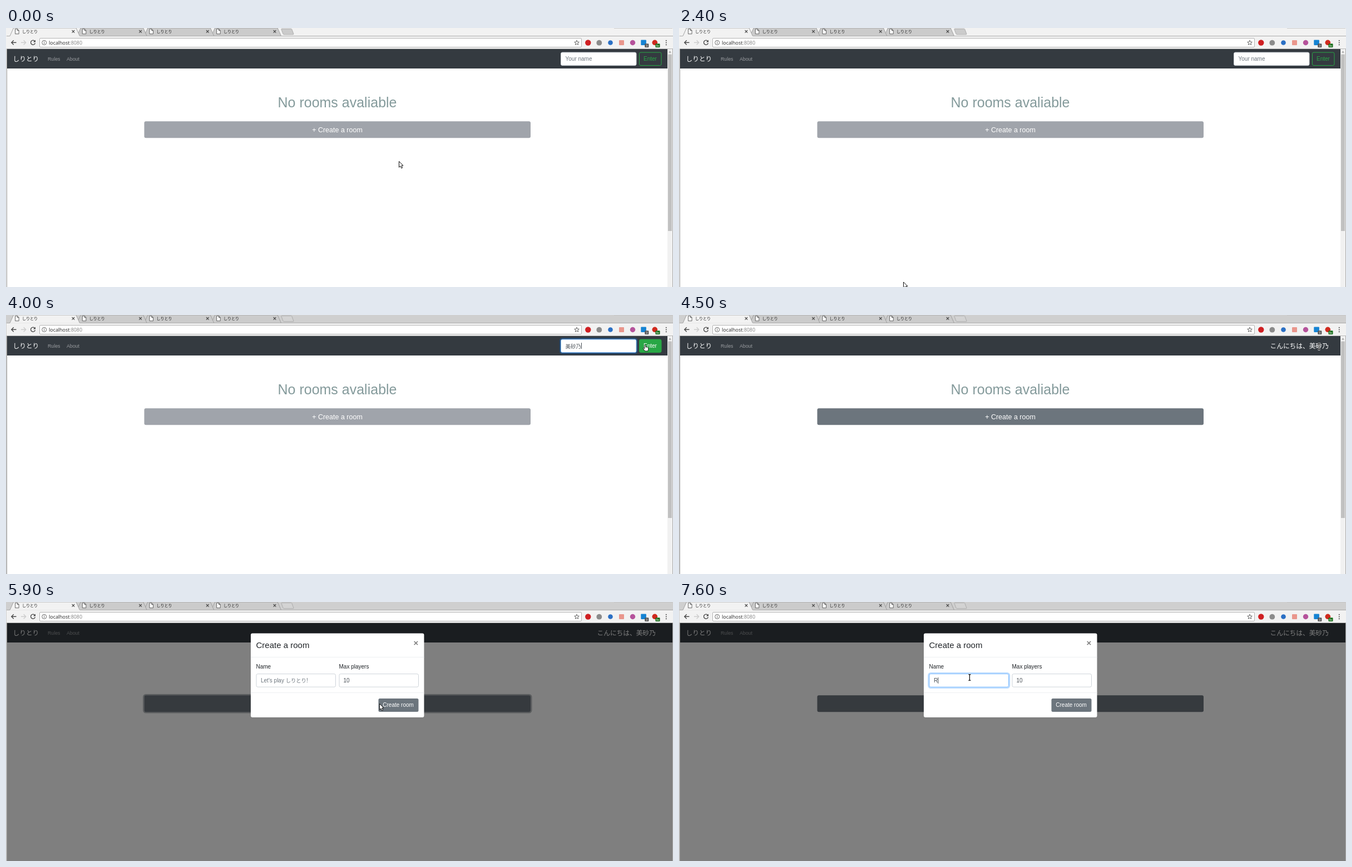
These frames come from a looping animation (1199 px wide and 467 px high, 8 s). An HTML page:

```html
<!DOCTYPE html>
<html lang="ja">
<head>
<meta charset="utf-8">
<title>しりとり</title>
<style>
html, body { margin: 0; width: 100%; height: 100%; overflow: hidden; background: #fff; }
svg { display: block; width: 1199px; height: 467px; }
text { font-family: "Liberation Sans", "Noto Sans CJK JP", "Noto Sans CJK", sans-serif; white-space: pre; }
.jp { font-family: "Noto Sans CJK JP", "Noto Sans CJK", sans-serif; }
.url { font-family: "Noto Sans", sans-serif; }
</style>
</head>
<body>
<svg id="stage" viewBox="0 0 1199 467"></svg>
<script>
const LOOP = 8000;
const USER = "美砂乃";
const stage = document.getElementById("stage");

const rect = (x, y, w, h, fill, more = "") =>
  `<rect x="${x}" y="${y}" width="${w}" height="${h}" fill="${fill}" ${more}/>`;
const text = (x, y, size, fill, str, more = "") =>
  `<text x="${x}" y="${y}" font-size="${size}" fill="${fill}" ${more}>${str}</text>`;
const path = (d, stroke, width = 1, fill = "none", more = "") =>
  `<path d="${d}" stroke="${stroke}" stroke-width="${width}" fill="${fill}" ${more}/>`;
const circle = (x, y, r, fill, more = "") =>
  `<circle cx="${x}" cy="${y}" r="${r}" fill="${fill}" ${more}/>`;
const group = (id, body, more = "") => `<g id="${id}" ${more}>${body}</g>`;
const field = (x, y, w, h) => rect(x, y, w, h, "#fff", 'rx="2.5" stroke="#ced4da"');
const focusField = (x, y, w, h) =>
  rect(x - 1.5, y - 1.5, w + 3, h + 3, "none", 'rx="4" stroke="#007bff" stroke-opacity=".28" stroke-width="2.4"') +
  rect(x, y, w, h, "#fff", 'rx="2.5" stroke="#80bdff"');
const caret = (id, x, y) => rect(x, y, 1, 11, "#495057", `id="${id}"`);
const JP = 'class="jp"';

function tab(i) {
  const x = i * 120.7;
  const shape = `M${7 + x} 14.5L${13.5 + x} 0H${126 + x}L${132.5 + x} 14.5`;
  return path(shape, "#9a9a9a", 0.9, i ? "#cbcbcb" : "#f2f2f2", i ? 'class="tab"' : "") +
    path(`M${16.6 + x} 1.8h4l2.5 2.5v6.4h-6.5zM${20.4 + x} 1.8v2.7h2.7`, "#555", 0.9, "#fff") +
    text(29 + x, 8.8, 7, "#222", "しりとり", JP) +
    path(`M${118.6 + x} 4l4.6 4.6m0-4.6l-4.6 4.6`, "#444", 1.1);
}

function browser() {
  const tabs = [3, 2, 1, 0].map(tab).join("");
  const icons =
    path("M18.5 26.3H10m3.8-4l-4 4 4 4", "#4a4a4a", 1.4) +
    path("M27 26.3h8.5m-3.8-4l4 4-4 4", "#cdcdcd", 1.4) +
    path("M51.8 23.8a4 4 0 1 0 .6 3.4", "#4a4a4a", 1.4) +
    path("M53 21.6v4h-4z", "none", 0, "#4a4a4a") +
    circle(68.7, 26.4, 4, "none", 'stroke="#555" stroke-width=".9"') +
    path("M68.7 25.7v2.8m0-4.8v1.1", "#555", 1) +
    path("M1026 22.2l1.2 2.9 3.1.2-2.4 2 .8 3-2.7-1.7-2.7 1.7.8-3-2.4-2 3.1-.2z", "#555", 0.9) +
    circle(1046.3, 26.5, 5.2, "#cf1f22") +
    circle(1066.3, 26.7, 4.9, "#8b8b8b") +
    circle(1086.5, 26.5, 4.3, "#2a6fc4") +
    rect(1102, 22, 9, 9, "#e9968c", 'rx="1"') +
    circle(1126.5, 26.5, 4.7, "#b5529b") +
    rect(1141.3, 21.4, 9.6, 9.6, "#1583d3", 'rx="1"') +
    circle(1166.3, 26.3, 4.8, "#d02a1e") +
    rect(1148.3, 28.3, 7, 6.6, "#555", 'rx="1"') + text(1150.2, 33.8, 5.5, "#fff", "3") +
    rect(1167.5, 28.3, 8, 6.6, "#146b16", 'rx="1"') + text(1168.8, 33.8, 5, "#fff", "9x") +
    [22.7, 26.5, 30.3].map(y => circle(1186.8, y, 1.05, "#4a4a4a")).join("");
  return rect(0, 0, 1199, 467, "#f2f2f2", 'id="strip"') +
    rect(1093, 0, 105, 0.8, "#c4c4c4") +
    tabs +
    path("M495.5 1.5h17q1 0 1.4 1l3 8q.4 1.3-1 1.3h-16q-1.4 0-1.9-1.2l-3-8q-.3-1.1.5-1.1z", "#a8a8a8", 0.9, "#cbcbcb", 'id="plus"') +
    rect(1, 14.5, 1198, 23.5, "#f2f2f2") +
    path("M1 14.5H7M132.5 14.5H1199", "#a4a4a4", 0.9) +
    rect(60.5, 18.5, 974, 16, "#fff", 'rx="1.5" stroke="#b4b4b4"') +
    text(77, 29.6, 8.85, "#333", 'localhost<tspan fill="#888">:8080</tspan>', 'class="url"') +
    icons +
    rect(1, 37, 1198, 1, "#b8b8b8");
}

function page() {
  const scrollbar = rect(1189, 38, 9, 429, "#f1f1f1") +
    rect(1190, 47.5, 7, 318.5, "#c1c1c1") + path("M1191 44.5l2.5-3 2.5 3z", "none", 0, "#a0a0a0");
  const login = group("blurred", field(997.5, 44, 135.5, 23.5) + text(1005.5, 59.3, 10, "#6c757d", "Your name")) +
    group("typed", focusField(997.5, 44, 135.5, 23.5) +
      text(1005.5, 59.5, 9.4, "#495057", USER, JP) + caret("", 1034, 50)) +
    rect(1138.5, 44, 39.5, 23.5, "none", 'id="enter" rx="2.5" stroke="#28a745"') +
    text(1146, 59.3, 10, "#28a745", "Enter", 'id="enterText"');
  return rect(2, 38, 1196, 429, "#fff") +
    rect(2, 38, 1196, 35, "#343a40") +
    group("scroll", scrollbar) +
    text(12.5, 60.2, 11.7, "#fff", "しりとり", JP) +
    text(75, 59, 8.75, "#999c9f", "Rules") + text(109, 59, 8.75, "#999c9f", "About") +
    group("login", login) +
    text(1062.5, 60.2, 11.7, "#fff", "こんにちは、" + USER, `${JP} id="hello"`) +
    text(595.5, 143, 25, "#849a9b", "No rooms avaliable", 'text-anchor="middle"') +
    rect(247.3, 167.3, 697, 32, "none", 'id="ring" rx="4" stroke="#b5babe" stroke-width="2.4"') +
    rect(248.5, 168.3, 694.5, 30, "#a0a4ab", 'id="create" rx="3"') +
    text(595.5, 187.8, 12.5, "#fff", "+ Create a room", 'text-anchor="middle"');
}

function modal() {
  const hint = group("hint", text(458, 144.8, 10, "#6c757d", "Let's play ") +
    text(502.7, 144.8, 9.3, "#6c757d", "しりとり", JP) + text(540, 144.8, 10, "#6c757d", "!"));
  return rect(2, 38, 1196, 429, "#000", 'opacity=".5"') +
    rect(440, 56.5, 311.5, 151.5, "#fff", 'rx="3"') +
    text(449.5, 82.6, 15, "#212529", "Create a room") +
    text(732.5, 79, 15, "#7f7f7f", "×", 'font-weight="bold"') +
    rect(440, 99, 311.5, 0.8, "#e9ecef") + rect(440, 163, 311.5, 0.8, "#e9ecef") +
    text(449.5, 120.3, 10, "#212529", "Name") + text(598.5, 120.3, 10, "#212529", "Max players") +
    group("nameIdle", field(450, 129.7, 142.5, 23.5)) +
    group("nameFocus", focusField(450, 129.7, 142.5, 23.5)) +
    field(599, 129.7, 142.5, 23.5) +
    hint + text(458, 144.8, 10, "#495057", "R", 'id="letter"') + caret("caret", 458, 136) +
    text(606.5, 144.8, 10, "#495057", "10") +
    rect(669.5, 174, 72, 24, "#6c757d", 'rx="2.5"') +
    text(677.3, 189.3, 10, "#fff", "Create room");
}

const beam = "M-2-5.5Q0-5.5 0-4.2Q0-5.5 2-5.5M0-4.2V4.2M-2 5.5Q0 5.5 0 4.2Q0 5.5 2 5.5";
const pointers =
  group("arrow", path("M.5 .5V11.2L3 8.9l1.8 4 1.9-.9L4.9 8.1H8z", "#111", 1, "#fff")) +
  group("beam", path(beam, "#fff", 2.6) + path(beam, "#111", 1.3)) +
  group("hand", path("M-1 1q0-1.4 1-1.4T1 1v3q1-.7 1.7.1 1-.6 1.6.3 1.3-.2 1.3 1.2v3L4.6 11H-.5l-3-4.2q-.4-1.6 1-1.2l1.5 1z", "#111", 0.9, "#fff"));

stage.innerHTML = group("base", browser() + page()) + group("modal", modal()) +
  rect(1, 38, 1, 429, "#999") + rect(1198, 38, 1, 429, "#aaa") + group("pointer", pointers);

const el = id => document.getElementById(id);
const show = (id, on) => el(id).setAttribute("display", on ? "inline" : "none");
const paint = (id, fill) => el(id).setAttribute("fill", fill);

// start time, pointer kind, x, y
const moves = [
  [0, "arrow", 706, 240], [200, "arrow", 560, 338], [300, "arrow", 388, 440],
  [400, "", 0, 0], [2400, "arrow", 403, 457.5], [2500, "arrow", 738, 218],
  [3600, "beam", 1115.6, 58.5], [4000, "hand", 1149, 54], [4500, "beam", 1150.5, 57],
  [4900, "arrow", 783, 161], [5400, "arrow", 671, 183], [6700, "beam", 522.4, 136]
];

function draw(t) {
  const [, kind, x, y] = moves.filter(m => m[0] <= t).pop();
  ["arrow", "beam", "hand"].forEach(k => show(k, k === kind));
  el("pointer").setAttribute("transform", `translate(${x} ${y})`);

  const active = t >= 3600, hover = t >= 4000, joined = t >= 4500;
  paint("strip", active ? "#cfcfcf" : "#f2f2f2");
  paint("plus", active ? "#d3d3d3" : "#cbcbcb");
  show("blurred", !active);
  show("typed", active);
  paint("enter", hover ? "#28a745" : "none");
  paint("enterText", hover ? "#fff" : "#28a745");
  show("login", !joined);
  show("hello", joined);
  show("scroll", t < 5400);

  const open = t >= 5900, focus = t >= 6700, wrote = t >= 7600;
  paint("create", !joined ? "#a0a4ab" : t >= 5400 && !open ? "#5a6268" : "#6c757d");
  show("ring", open && !focus);
  show("modal", open);
  show("nameIdle", !focus);
  show("nameFocus", focus);
  show("hint", !wrote);
  show("letter", wrote);
  show("caret", focus && (t < 7100 || wrote));
  el("caret").setAttribute("x", wrote ? 465.3 : 458);
}

const start = performance.now();
function tick() {
  draw((performance.now() - start) % LOOP);
  requestAnimationFrame(tick);
}
tick();
</script>
</body>
</html>
```
